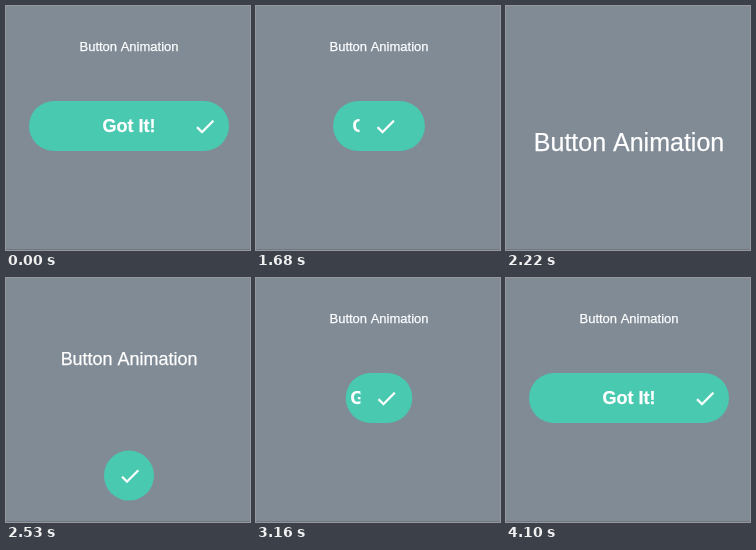
These frames come from a looping animation (244x244 px, 5010 ms). An HTML page with a canvas:

```html
<!DOCTYPE html>
<html lang="en">
<head>
<meta charset="utf-8">
<title>Button Animation</title>
<style>
  html, body { margin: 0; width: 100%; height: 100%; overflow: hidden; background: #808b96; }
  canvas { display: block; width: 244px; height: 244px; }
</style>
</head>
<body>
<canvas id="stage"></canvas>
<script>
const SIZE = 244, LOOP = 5010, CENTER = 123;
const FONT = '"Liberation Sans", Arial, sans-serif';
const canvas = document.getElementById('stage');
const ctx = canvas.getContext('2d', { alpha: false });
const ratio = window.devicePixelRatio || 1;
canvas.width = canvas.height = Math.round(SIZE * ratio);

const checkIcon = new Path2D('M9 16.17L4.83 12l-1.42 1.41L9 19 21 7l-1.41-1.41z');

function bezier(x1, y1, x2, y2) {
  const curve = (s, a, b) => 3 * s * (1 - s) ** 2 * a + 3 * s * s * (1 - s) * b + s ** 3;
  return x => {
    if (x <= 0) return 0;
    if (x >= 1) return 1;
    let low = 0, high = 1;
    for (let i = 0; i < 30; i++) {
      const mid = (low + high) / 2;
      if (curve(mid, x1, x2) < x) low = mid; else high = mid;
    }
    return curve(low, y1, y2);
  };
}

const ease = bezier(0.25, 0.1, 0.25, 1);
const snap = bezier(0.25, 0.1, 0.05, 1);

// The motion advances in steps of about 77 ms.
function stepTime(t) {
  if (t < 1450) return 0;
  const [start, step] = t < 3160 ? [1450, 77.1] : [3160, 76.6];
  const stepped = start + Math.floor((t - start) / step) * step;
  return t < 3160 ? Math.min(stepped, 2915) : stepped;
}

function pose(t) {
  const opening = t >= 3105;
  return {
    width: opening ? ease((t - 3105) / 500) : 1 - ease((t - 1390) / 500),
    check: opening ? ease((t - 3113) / 500) : 1 - ease((t - 1390) / 320),
    drop: ease((t - 1888) / 500) - snap((t - 2389) / 510),
    spacing: opening ? 2.2 * Math.max(0, (4090 - t) / 470) ** 1.5 : 0
  };
}

// A hairline outline gives the glyphs their slightly heavier weight.
function drawText(text, x, y) {
  ctx.fillStyle = ctx.strokeStyle = '#fff';
  ctx.lineWidth = 0.25;
  ctx.fillText(text, x, y);
  ctx.strokeText(text, x, y);
}

function drawTitle(drop) {
  const size = 13 + 13 * drop;
  ctx.font = `${size}px ${FONT}`;
  ctx.letterSpacing = '0px';
  ctx.textAlign = 'center';
  drawText('Button Animation', CENTER, 40.3 + 104 * drop + size * 0.36);
}

function drawLabel(left, right, y, spacing) {
  if (right <= left) return;
  ctx.save();
  ctx.beginPath();
  ctx.rect(left, y - 25, right - left, 50);
  ctx.clip();
  ctx.font = `bold 18px ${FONT}`;
  ctx.letterSpacing = `${spacing}px`;
  ctx.textAlign = 'left';
  const textWidth = ctx.measureText('Got It!').width;
  drawText('Got It!', Math.max(left + 4.7, CENTER - textWidth / 2), y + 6);
  ctx.restore();
}

function drawCheck(x, y) {
  ctx.save();
  ctx.translate(x - 12, y - 12);
  ctx.fillStyle = ctx.strokeStyle = '#fff';
  ctx.lineWidth = 0.3;
  ctx.fill(checkIcon);
  ctx.stroke(checkIcon);
  ctx.restore();
}

function drawButton({ width, check, drop, spacing }) {
  const y = 120 + 203 * drop;
  const half = 25 + 75 * width;
  const checkX = CENTER + 75 * check;

  ctx.fillStyle = '#48c9b0';
  ctx.beginPath();
  ctx.roundRect(CENTER - half, y - 25, half * 2, 50, 25);
  ctx.fill();

  drawLabel(CENTER - half, checkX - 25, y, spacing);
  drawCheck(checkX + 1, y + 0.5);
}

function render(now) {
  const state = pose(stepTime(now % LOOP));
  ctx.setTransform(ratio, 0, 0, ratio, 0, 0);
  ctx.fillStyle = '#808b96';
  ctx.fillRect(0, 0, SIZE, SIZE);
  ctx.fillStyle = '#6f7882';
  ctx.fillRect(0, SIZE - 1, SIZE, 1);
  drawButton(state);
  drawTitle(state.drop);
}

const startTime = performance.now();
function tick() {
  render(performance.now() - startTime);
  requestAnimationFrame(tick);
}
tick();
</script>
</body>
</html>
```
